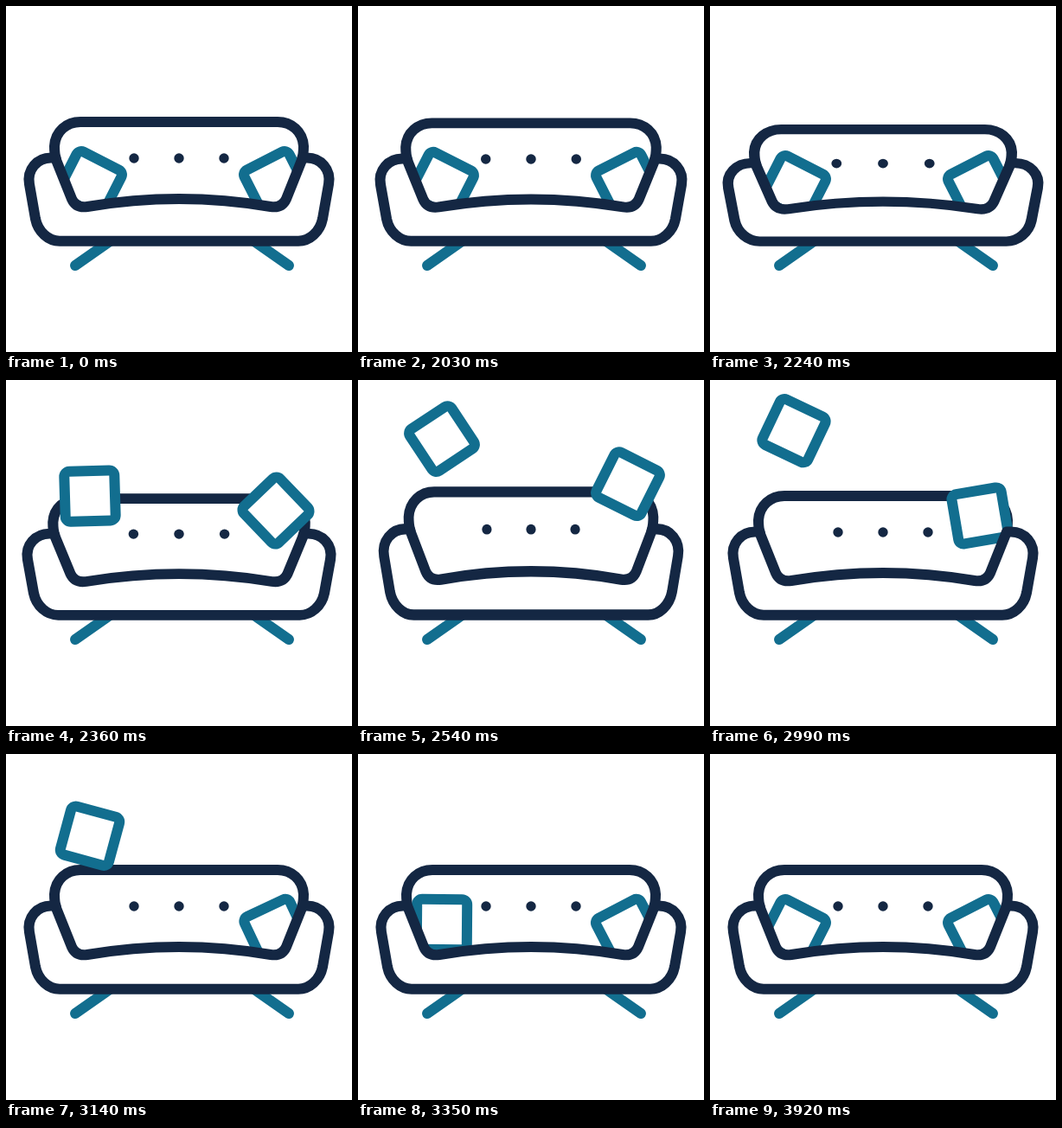
An HTML page that plays this animation: 400 px wide and 400 px high, repeating every 3950 ms.

```html
<!DOCTYPE html>
<html lang="en">
<head>
<meta charset="utf-8">
<title>Sofa</title>
<style>
  html, body { margin: 0; width: 100%; height: 100%; overflow: hidden; background: #fff; }
  svg { display: block; width: 100vw; height: 100vh; }
  .line { fill: #fff; stroke-width: 12; stroke-linecap: round; stroke-linejoin: round; }
  .dark { stroke: #142743; }
  .teal { stroke: #126e8f; }
  .dots { fill: #142743; }
</style>
</head>
<body>
<svg viewBox="0 0 400 400">
  <path class="line teal" d="M80 300L120 272M327 300L287 272"/>
  <g class="sofa">
    <path class="line dark" d="M58 177C56 172 56 167 56 162C57 145 70 134 86 134H314C330 134 343 145 344 162C344 167 344 172 342 177"/>
    <g class="dots">
      <circle cx="148" cy="176" r="5.7"/>
      <circle cx="200" cy="176" r="5.7"/>
      <circle cx="252" cy="176" r="5.7"/>
    </g>
  </g>
  <rect class="line teal pillow" x="-29" y="-29" width="58" height="58" rx="6"/>
  <rect class="line teal pillow" x="-29" y="-29" width="58" height="58" rx="6"/>
  <g class="sofa">
    <path class="line dark" d="M57 175.500H52C36 175.500 24 189 27 206L34 246C37 261 49 271.700 62 271.700H338C351 271.700 363 261 366 246L373 206C376 189 364 175.500 348 175.500H343L324 223Q319 234 306 232Q200 214 94 232Q81 234 76 223Z"/>
  </g>
</svg>
<script>
const LOOP = 3950, START = 2030, LAUNCH = 2255;
const REST = 205, DIP = 5;

// early and late shape the spin, kick is the tilt left over on landing.
const pillows = [
  { x: 97, angle: 27, top: 51, peak: 2800, land: 3308, early: .9, late: .54, kick: -32 },
  { x: 312, angle: -27, top: 119.5, peak: 2612, land: 3110, early: .59, late: .51, kick: 2 }
];

// Swings from 1 and fades to nothing within the given life.
function ring(time, period, life) {
  return Math.max(0, 1 - time / life) ** 1.5 * Math.cos(2 * Math.PI * time / period);
}

function bezier(u, a, b) {
  return 3 * a * u * (1 - u) ** 2 + 3 * b * u * u * (1 - u) + u ** 3;
}

function squash(t) {
  if (t < START) return 0;
  const press = (t - START + 25) / (LAUNCH - START + 25);
  return press < 1 ? Math.sin(press * Math.PI / 2) : ring(t - LAUNCH, 590, 850);
}

function pose({ angle, top, peak, land, early, late, kick }, t) {
  const floor = tilt => REST - .3 * Math.abs(tilt);
  if (t < LAUNCH) return [REST + DIP * squash(t), angle];
  if (t < land) {
    const [base, edge] = t < peak ? [REST + DIP, LAUNCH] : [floor(kick), land];
    const y = top + (base - top) * ((t - peak) / (edge - peak)) ** 3;
    return [y, angle + (kick - 90) * bezier((t - LAUNCH) / (land - LAUNCH), early, late)];
  }
  const tilt = kick * ring(t - land, 700, 600);
  return [floor(tilt), angle - 90 + tilt];
}

const sofaParts = document.querySelectorAll('.sofa');
const pillowParts = document.querySelectorAll('.pillow');

function draw(t) {
  const s = squash(t);
  const scale = `translate(200 277) scale(${1 + .0335 * s} ${1 - .06 * s}) translate(-200 -277)`;
  sofaParts.forEach(part => part.setAttribute('transform', scale));
  pillows.forEach((pillow, i) => {
    const [y, turn] = pose(pillow, t);
    pillowParts[i].setAttribute('transform', `translate(${pillow.x} ${y}) rotate(${turn})`);
  });
}

const begin = performance.now();
function tick() {
  draw((performance.now() - begin) % LOOP);
  requestAnimationFrame(tick);
}
tick();
</script>
</body>
</html>
```
